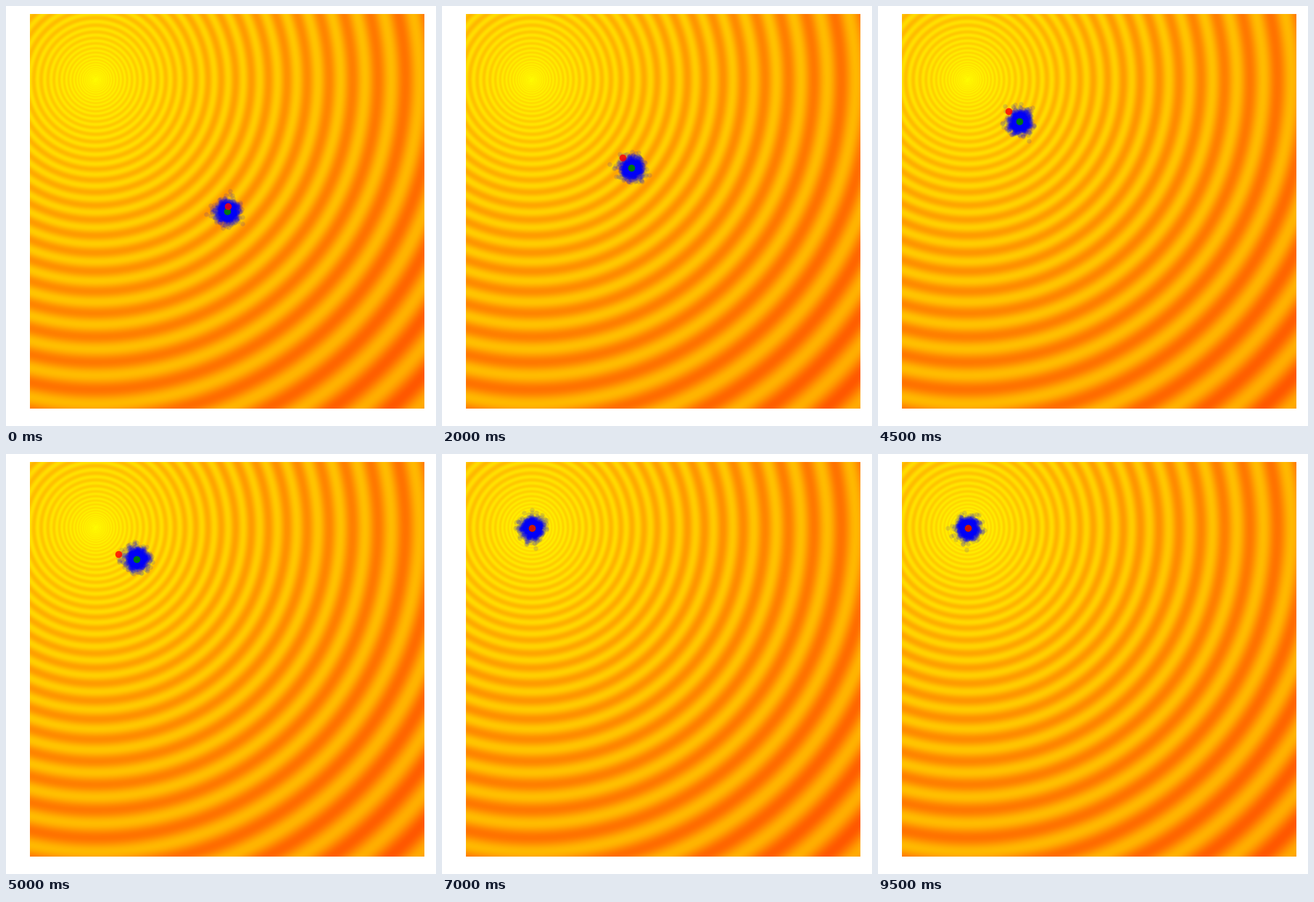
These frames come from a looping animation (593 px wide and 579 px high, 10 s). A matplotlib script:

```python
import numpy as np
import matplotlib.pyplot as plt
from matplotlib.animation import FuncAnimation

WIDTH, HEIGHT, DPI = 593, 579, 64
LEFT, TOP, SIDE = 33, 11, 544
UNITS_PER_PX = 600 / SIDE
OPTIMUM = np.array([LEFT + SIDE / 6, TOP + SIDE / 6])
POPULATION, SIGMA = 1000, 7.4
FRAMES, INTERVAL = 20, 500

# Key points of the descent: generation, valley ring, bearing in degrees.
DESCENT = np.array([
    (0, 49.2, 45), (1, 49, 43.7), (7, 43, 39.1), (8, 42, 41),
    (10, 38, 37), (12, 32, 61.5), (13, 24, 105), (14, 0, 105),
])


def schaffer(dx, dy):
    r = np.hypot(dx, dy) * UNITS_PER_PX
    return np.sqrt(r) * (np.sin(50 * r ** 0.2) ** 2 + 1)


def mean_at(generation):
    keys, rings, bearings = DESCENT.T
    ring = np.interp(generation, keys, rings)
    bearing = np.radians(np.interp(generation, keys, bearings))
    # Valleys lie where the sine of 50 r^0.2 is zero.
    radius = (ring * np.pi / 50) ** 5 / UNITS_PER_PX
    return OPTIMUM + 0.6 + radius * np.array([np.cos(bearing), np.sin(bearing)])


def points(px):
    return px * 72 / DPI


def dot(color, alpha):
    return ax.plot([], [], "o", color=color, ms=points(9.6), mew=0,
                   alpha=alpha)[0]


fig = plt.figure(figsize=(WIDTH / DPI, HEIGHT / DPI), dpi=DPI, facecolor="white")
ax = fig.add_axes([0, 0, 1, 1])
ax.axis("off")

steps = np.arange(SIDE) + 0.5
dx, dy = np.meshgrid(LEFT + steps - OPTIMUM[0], TOP + steps - OPTIMUM[1])
ax.imshow(-schaffer(dx, dy), cmap="autumn", vmin=-79, vmax=0, aspect="auto",
          interpolation="nearest",
          extent=(LEFT, LEFT + SIDE, TOP + SIDE, TOP))
ax.set_xlim(0, WIDTH)
ax.set_ylim(HEIGHT, 0)

cloud = ax.scatter([], [], s=points(6.4) ** 2, c="blue", alpha=0.13,
                   linewidths=0, zorder=2)
mean_dot = dot("green", 0.92)
best_dot = dot("red", 0.82)


def draw(generation):
    # Each generation is sampled around the best of the previous one.
    rng = np.random.default_rng(generation)
    mean, best = mean_at(generation), mean_at(generation + 1)
    cloud.set_offsets(mean + SIGMA * rng.standard_normal((POPULATION, 2)))
    mean_dot.set_data([mean[0]], [mean[1]])
    best_dot.set_data([best[0]], [best[1]])
    return cloud, mean_dot, best_dot


animation = FuncAnimation(fig, draw, frames=FRAMES, interval=INTERVAL,
                          repeat=True, repeat_delay=0)
plt.show()
```
